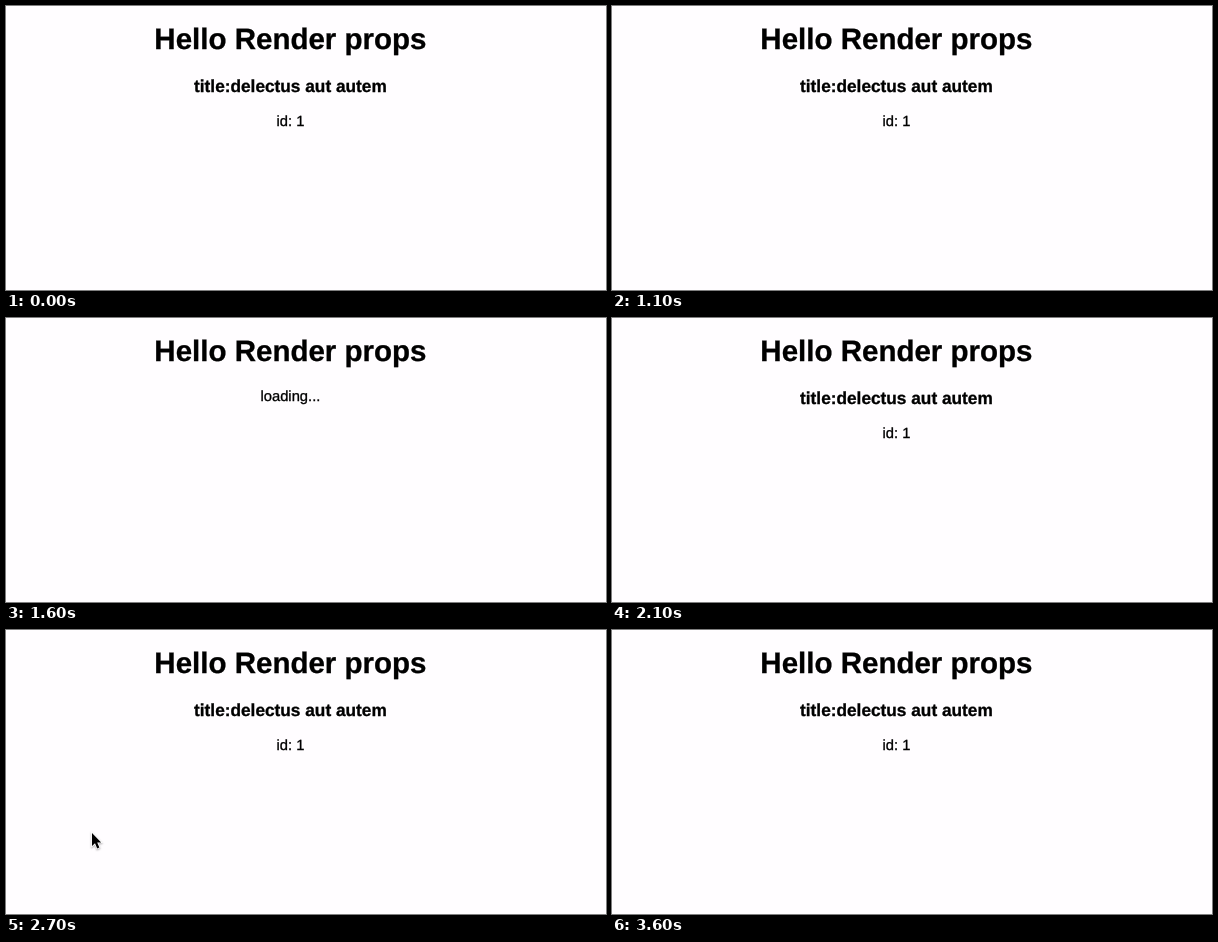
Recreate the animation shown at these times as an HTML page with a canvas. Size 600 px wide and 284 px high, loop 3.9 s.

```html
<!DOCTYPE html>
<html lang="en">
<head>
<meta charset="utf-8">
<title>Hello Render props</title>
<style>
  html, body { margin: 0; width: 100%; height: 100%; overflow: hidden; background: #fffdff; }
  canvas { display: block; }
</style>
</head>
<body>
<canvas id="stage" width="600" height="284"></canvas>
<script>
const ctx = document.getElementById('stage').getContext('2d');
const LOOP = 3900, STEP = 100, CENTER = 284.4, EM = 14.75;
const FAMILY = 'Helvetica, "Liberation Sans", Arial, sans-serif';

// Pointer position on each step from POINTER_START
const POINTER_START = 2700;
const POINTER_PATH = [[86, 203], [88, 187], [95, 154], [107, 105], [125, 7]];

// The thin stroke gives the slightly heavier look of smoothed screen type
function text(str, y, scale, weight) {
  ctx.font = `${weight} ${EM * scale}px ${FAMILY}`;
  ctx.textRendering = 'geometricPrecision';
  ctx.lineWidth = 0.3;
  ctx.fillText(str, CENTER, y);
  ctx.strokeText(str, CENTER, y);
}

function pointer(x, y) {
  const outline = [[0, 0], [0, 13], [3, 10.3], [5.2, 15.4], [7.4, 14.4], [5.2, 9.6], [9.2, 9.4]];
  ctx.save();
  ctx.translate(x, y);
  ctx.beginPath();
  outline.forEach(([px, py]) => ctx.lineTo(px, py));
  ctx.closePath();
  ctx.shadowColor = 'rgba(0, 0, 0, 0.35)';
  ctx.shadowBlur = 2;
  ctx.shadowOffsetY = 1;
  ctx.lineWidth = 1.6;
  ctx.strokeStyle = '#fff';
  ctx.stroke();
  ctx.shadowColor = 'transparent';
  ctx.fill();
  ctx.restore();
}

function draw(t) {
  ctx.fillStyle = '#fffdff';
  ctx.fillRect(0, 0, 600, 284);
  if (t >= 1200 && t < 1600) return;

  ctx.fillStyle = ctx.strokeStyle = '#000';
  ctx.textAlign = 'center';
  text('Hello Render props', 43, 2, 'bold');
  if (t >= 1600 && t < 2000) {
    text('loading...', 83, 1, 'normal');
    return;
  }
  text('title:delectus aut autem', 86, 1.17, 'bold');
  text('id: 1', 120, 1, 'normal');

  const spot = POINTER_PATH[Math.floor((t - POINTER_START) / STEP)];
  if (spot) pointer(...spot);
}

const start = performance.now();
function tick() {
  draw((performance.now() - start) % LOOP);
  requestAnimationFrame(tick);
}
tick();
</script>
</body>
</html>
```
